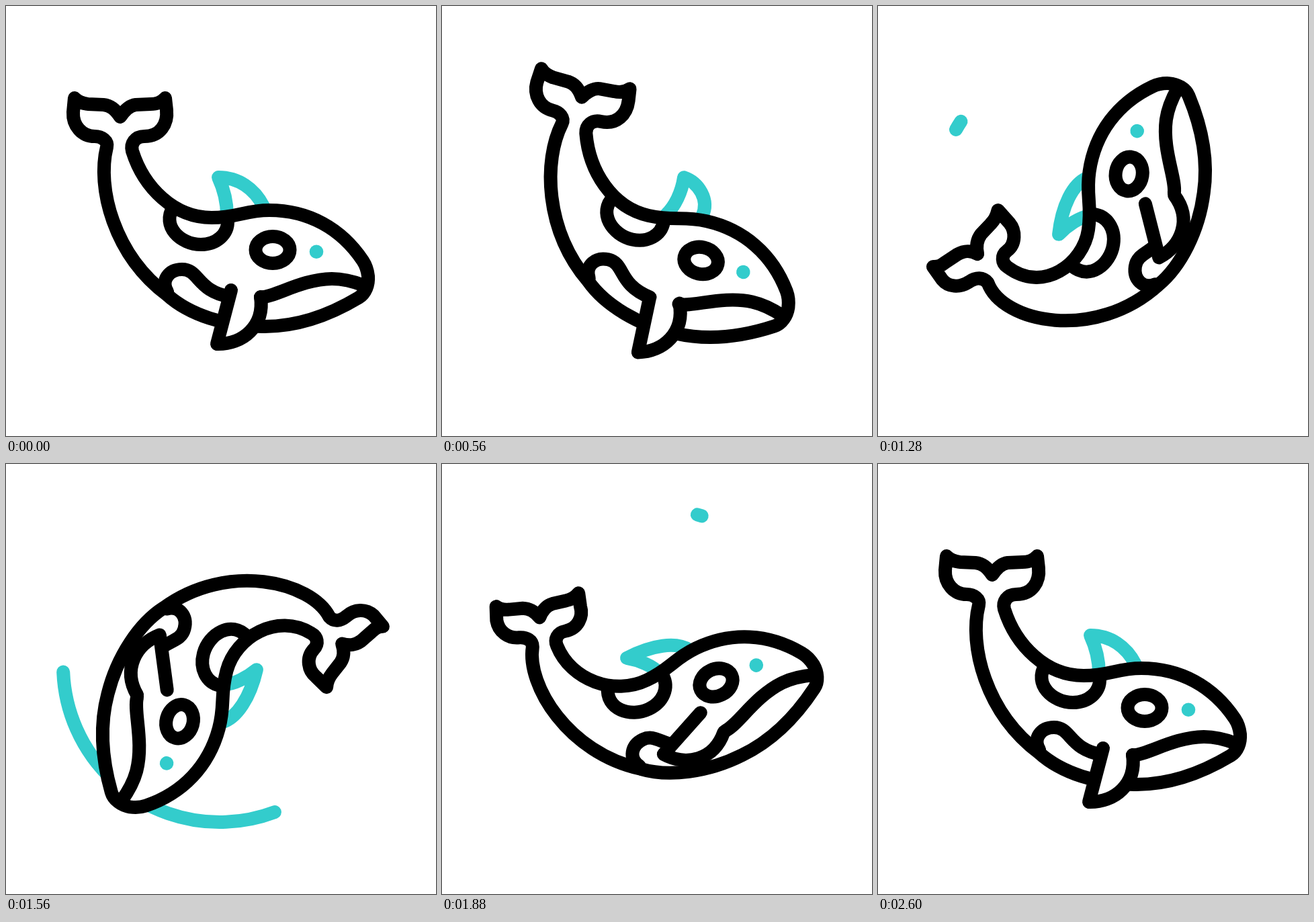
Recreate the animation shown at these times as an HTML page with a canvas. Size 640 by 640 pixels, loop 2700 ms.

```html
<!DOCTYPE html>
<html lang="en">
<head>
<meta charset="utf-8">
<title>Somersaulting orca</title>
<style>
  html, body { margin: 0; width: 100%; height: 100%; overflow: hidden; background: #fff; }
  canvas { display: block; width: 640px; height: 640px; }
</style>
</head>
<body>
<canvas id="stage" width="640" height="640"></canvas>
<script>
const ctx = document.getElementById('stage').getContext('2d');
const LOOP = 2700, STEP = 20, BLACK = '#000', CYAN = '#33cccc';
const rad = deg => deg * Math.PI / 180;

// Outline of back, flukes and belly: relaxed and curled
const tailRest = 'M306 315C250 315 205 270 188 216C185 205 192 194 206 194C230 194 241 175 239 155' +
  'L237 137C230 145 222 146 215 146L193 147C185 148 178 153 170 165C162 153 155 148 145 147' +
  'L122 146C116 145 108 144 102 137L100 158C99 178 113 194 132 194C143 194 152 201 150 210' +
  'C135 270 160 370 240 430';
const tailCurled = 'M306 315C255 315 202 262 234 204C239 194 250 192 258 200C270 212 290 208 299 198' +
  'L316 178C305 177 300 174 294 170L277 158C268 153 258 153 247 157C251 146 250 137 242 127' +
  'L228 111C224 107 220 104 219 94L202 110C192 121 193 137 204 150C213 160 214 170 207 178' +
  'C150 208 143 350 240 430';
const head = 'C272 459 328 478 385 477C440 477 490 455 525 434C535 428 540 415 539 402' +
  'C538 393 535 385 531 379C499 331 450 304 392 304C355 304 345 315 306 315Z';

const dorsalRest = 'M329 312C329 290 323 270 316 255C346 255 370 272 383 298';
const dorsalRaised = 'M331 308C342 293 348 270 346.5 247.5C369 250 391 272 384 298';
const dorsalFolded = 'M326 312C323 300 308 283 293 272.5C335 271 370 282 382 302';

const markings = new Path2D(
  'M249 299C231 328 260 355 290 355C313 355 331 340 330 319' +
  'M240 425C230 408 243 392 262 392C288 392 284 425 335 433');
markings.moveTo(422.5, 363);
markings.ellipse(397, 363, 25.5, 20, 0, 0, 2 * Math.PI);
const mouth = new Path2D('M379 433.5C400 433.5 440 406.5 485 406C505 406 520 411 533 416');
const flipper = new Path2D('M335 423L314 503C352 504 385 477 379 433');
const flipperPivot = [375.8, 430];

// Keys are [time, value] pairs
const spin = [[100, 0], [640, 13.6], [960, 5.4], [1180, -41], [1280, -81.7], [1560, -255],
  [1740, -347], [1890, -386], [2340, -353.5], [2600, -360]];
const curl = [[580, 0], [930, 1], [1250, 1], [1560, .685], [1880, .42], [2260, .1], [2540, 0]];
const lift = [[100, 0], [640, 1], [1100, 0], [1900, 0], [2340, .65], [2600, 0]];
const fold = [[640, 0], [1100, 1], [1900, 1], [2340, 0]];
const trailHead = [[1238, 0], [1882, 1]];
const trailEnd = [[1464, 0], [1900, 1]];

// Smooth curve through the keys, flat at every peak and hold
function at(keys, t) {
  const last = keys.length - 1;
  if (t <= keys[0][0]) return keys[0][1];
  if (t >= keys[last][0]) return keys[last][1];
  const i = keys.findIndex(key => key[0] > t) - 1;
  const slope = k => (keys[k + 1][1] - keys[k][1]) / (keys[k + 1][0] - keys[k][0]);
  const tangent = k => {
    if (k === 0 || k === last) return 0;
    const a = slope(k - 1), b = slope(k);
    return a * b > 0 ? 2 * a * b / (a + b) : 0;
  };
  const [t0, v0] = keys[i], [t1, v1] = keys[i + 1];
  const span = t1 - t0, u = (t - t0) / span, w = 1 - u;
  return v0 * w * w * (1 + 2 * u) + v1 * u * u * (3 - 2 * u) +
    span * u * w * (tangent(i) * w - tangent(i + 1) * u);
}

// Adds weighted differences of same-structured paths to a base path
function morph(base, ...targets) {
  const number = /\d+(\.\d+)?/g;
  const parsed = targets.map(([path, weight]) => [path.match(number).map(Number), weight]);
  let i = 0;
  return base.replace(number, text => {
    const value = Number(text);
    const moved = parsed.reduce((sum, [list, w]) => sum + w * (list[i] - value), value);
    i++;
    return moved.toFixed(3);
  });
}

function draw(path, color, filled) {
  if (filled) {
    ctx.fillStyle = '#fff';
    ctx.fill(path);
  }
  ctx.strokeStyle = color;
  ctx.stroke(path);
}

function rotateAround([x, y], deg) {
  ctx.translate(x, y);
  ctx.rotate(rad(deg));
  ctx.translate(-x, -y);
}

function drawTrail(t) {
  const angle = part => rad(-146.6 - 288 * part);
  const front = at(trailHead, t), back = at(trailEnd, t);
  if (front <= back) return;
  const arc = new Path2D();
  arc.arc(318, 300, 233, angle(back), angle(front), true);
  draw(arc, CYAN);
}

function drawWhale(t) {
  const raised = at(lift, t), folded = at(fold, t);
  ctx.save();
  rotateAround([320, 320], at(spin, t));

  draw(new Path2D(morph(dorsalRest, [dorsalRaised, raised], [dorsalFolded, folded])), CYAN);
  draw(new Path2D(morph(tailRest, [tailCurled, at(curl, t)]) + head), BLACK, true);
  draw(markings, BLACK);

  ctx.save();
  rotateAround(flipperPivot, 52.7 * folded - 16.5 * raised);
  draw(flipper, BLACK, true);
  ctx.restore();

  draw(mouth, BLACK);
  ctx.fillStyle = CYAN;
  ctx.beginPath();
  ctx.arc(462, 365.7, 10.3, 0, 2 * Math.PI);
  ctx.fill();
  ctx.restore();
}

function frame() {
  const t = Math.floor(performance.now() % LOOP / STEP) * STEP;
  ctx.fillStyle = '#fff';
  ctx.fillRect(0, 0, 640, 640);
  ctx.lineWidth = 20;
  ctx.lineCap = ctx.lineJoin = 'round';
  drawTrail(t);
  drawWhale(t);
  requestAnimationFrame(frame);
}
frame();
</script>
</body>
</html>
```
